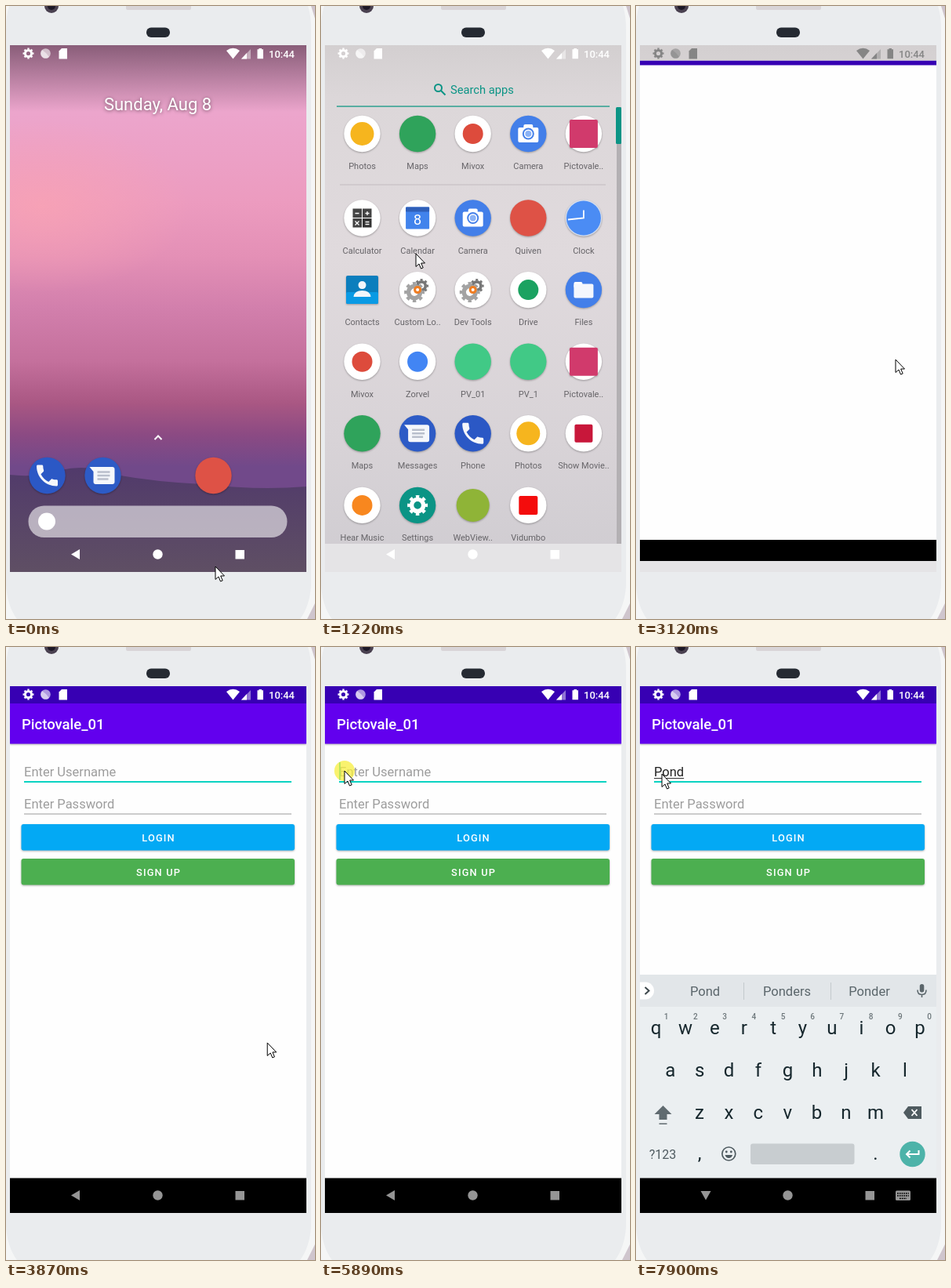
Write an HTML page that moves like this. It is 394 px wide and 782 px high and loops after 8000 ms.

```html
<!DOCTYPE html>
<html lang="en">
<head>
<meta charset="utf-8">
<title>Phone demo</title>
<style>
html, body { margin: 0; width: 100%; height: 100%; overflow: hidden; background: #f5f6f6; }
svg { display: block; width: 100%; height: 100%; font-family: Roboto, "Noto Sans", sans-serif; }
.mid { text-anchor: middle; }
.label { font-size: 11px; fill: #666468; text-anchor: middle; }
.button { font-size: 12.8px; font-weight: 500; letter-spacing: .09em; fill: #fff; text-anchor: middle; }
.lift { filter: drop-shadow(0 1px 1px rgba(0,0,0,.3)); }
.field { font-size: 16.5px; }
.hint { fill: #9d9d9d; }
.word { font-size: 16.5px; fill: #5b666b; text-anchor: middle; }
.key { font-size: 24px; fill: #16272d; text-anchor: middle; }
.digit { font-size: 10px; font-weight: 500; fill: #6d777b; text-anchor: middle; }
</style>
</head>
<body>
<svg viewBox="0 0 394 782">
<defs>
  <linearGradient id="sky" x2="0" y2="1">
    <stop offset="0" stop-color="#e3a3ca"/><stop offset=".13" stop-color="#ecA5cc"/>
    <stop offset=".3" stop-color="#ec9bbf"/><stop offset=".4" stop-color="#e490b6"/>
    <stop offset=".5" stop-color="#d27fac"/><stop offset=".6" stop-color="#c4709c"/>
    <stop offset=".68" stop-color="#a95783"/><stop offset=".74" stop-color="#8b4a83"/>
    <stop offset=".8" stop-color="#71498a"/><stop offset="1" stop-color="#71498a"/>
  </linearGradient>
  <radialGradient id="glow"><stop stop-color="#f9a3b4" stop-opacity=".8"/><stop offset="1" stop-color="#f9a3b4" stop-opacity="0"/></radialGradient>
  <linearGradient id="dune" x2="0" y2="1"><stop stop-color="#513a6b"/><stop offset="1" stop-color="#5f4f64"/></linearGradient>
  <linearGradient id="scrim" x2="0" y2="1"><stop stop-color="#301828" stop-opacity=".5"/><stop offset="1" stop-color="#301828" stop-opacity="0"/></linearGradient>
  <linearGradient id="sheet" x2="0" y2="1">
    <stop stop-color="#d3cfd0"/><stop offset=".1" stop-color="#dcd7d9"/><stop offset=".4" stop-color="#e0dadd"/>
    <stop offset=".75" stop-color="#d8d3d7"/><stop offset="1" stop-color="#cfccd1"/>
  </linearGradient>
  <clipPath id="screen"><rect x="5" y="50" width="378" height="672"/></clipPath>
  <clipPath id="reveal"><rect id="revealBox"/></clipPath>
</defs>

<!-- device body -->
<rect width="394" height="782" fill="#f5f6f6"/>
<path d="M389 0h5v16zM394 762v20h-10z" fill="#cfc5cd"/>
<path d="M4 0Q0 12 0 30V740Q2 766 14 782H375Q387 766 389 740V30Q389 12 385 0Z" fill="#eaecee"/>
<circle cx="58" cy="0" r="9" fill="#4a4150"/><circle cx="58" cy="0" r="5" fill="#1d1826"/>
<rect x="153" y="-4" width="83" height="9" rx="2" fill="#d8d4d7"/>
<rect x="179" y="27.500" width="30" height="12.500" rx="6" fill="#252a32"/>

<g clip-path="url(#screen)">
  <rect x="5" y="50" width="378" height="672" fill="url(#sky)"/>
  <ellipse cx="45" cy="255" rx="190" ry="110" fill="url(#glow)"/>
  <path d="M5 598Q40 602 70 592Q105 584 140 598Q190 607 250 610Q320 618 383 613V722H5Z" fill="url(#dune)"/>
  <rect x="5" y="50" width="378" height="85" fill="url(#scrim)"/>
  <g id="home"></g>
  <rect id="backdrop" x="5" y="50" width="378" height="672" fill="url(#sheet)"/>
  <g id="drawer"></g>
  <g clip-path="url(#reveal)"><g id="win">
    <rect x="5" y="50" width="378" height="690" fill="#fefefe"/>
    <g id="form"></g>
    <g id="keyboard"></g>
    <rect x="5" y="50" width="378" height="22" fill="#3700b3"/>
    <rect x="5" y="677.500" width="378" height="60" fill="#000"/>
  </g></g>
  <g id="status"></g>
  <g id="nav">
    <path id="back"/>
    <circle cx="193.500" cy="699.500" r="6.200"/>
    <rect x="292.500" y="694" width="11.500" height="11.500"/>
    <g id="switcher">
      <rect x="331" y="693.500" width="19" height="12.500" rx="1.500"/>
      <path d="M333 697h15M333 700h15M336 703.500h9" stroke="#000" stroke-width="1.500" stroke-dasharray="1.800 1"/>
    </g>
  </g>
</g>
<g id="pointer">
  <circle id="press" r="13" fill="#f7ee3e" opacity=".75"/>
  <path d="M0 0V16.500L4 13L6.500 19L9.200 17.900L6.700 12H11.500Z" fill="#fff" stroke="#000"/>
</g>
</svg>
<script>
const LOOP = 8000;
const $ = id => document.getElementById(id);
const show = (id, on) => $(id).setAttribute('display', on ? 'inline' : 'none');
const shift = (id, x, y) => $(id).setAttribute('transform', `translate(${x} ${y})`);

// ---------- drawing helpers ----------
const at = (x, y, body) => `<g transform="translate(${x} ${y})">${body}</g>`;
const disc = (color, r = 23.2) => `<circle r="${r}" fill="${color}"/>`;
const box = (x, y, w, h, color, rx = 0) => `<rect x="${x}" y="${y}" width="${w}" height="${h}" rx="${rx}" fill="${color}"/>`;
const text = (x, y, cls, s, more = '') => `<text x="${x}" y="${y}" class="${cls}" ${more}>${s}</text>`;
const line = (d, color, w = 2) => `<path d="${d}" fill="none" stroke="${color}" stroke-width="${w}"/>`;
const gear = (r, color) =>
  `<g fill="none" stroke="${color}"><circle r="${r * .58}" stroke-width="${r * .42}"/>` +
  `<circle r="${r * .86}" stroke-width="${r * .28}" pathLength="16" stroke-dasharray="1" stroke-dashoffset=".5"/></g>`;
const spot = (color, r = 13) => disc('#fff') + disc(color, r);
const tile = (color, s = 24) => disc('#fff') + box(-s / 2, -s / 2, s, s, color, 2);

const tools = disc('#fff') +
  at(5, -5, gear(9, '#777')) + at(-4, 3, gear(13, '#a3a3a3')) + disc('#ef7d22', 5) + disc('#fff', 2);

const icons = {
  photos: spot('#f6b51e', 15),
  maps: disc('#2fa35b'),
  mail: spot('#dd4b3c'),
  camera: disc('#437fe9') + box(-13, -8, 26, 19, '#fff', 2) + box(-6, -12, 12, 7, '#fff', 2) +
    disc('#437fe9', 7.5) + disc('#fff', 5.5) + disc('#8ab2f6', 4),
  pictures: tile('#d13a6c', 36),
  calculator: disc('#fff') + box(-12, -12, 11.5, 11.5, '#444') + box(.5, -12, 11.5, 11.5, '#444') +
    box(-12, .5, 11.5, 11.5, '#444') + box(.5, .5, 11.5, 11.5, '#333') +
    line('M-9 -6h5M4 -6h5M6.500 -8.500v5M-9 4l5 5M-4 4l-5 5M4 5h5M4 8h5', '#fff', 1.3),
  calendar: disc('#fff') + box(-15, -14, 30, 28, '#4183ec', 1) + box(-15, -14, 30, 6, '#2f5fb8', 1) +
    text(0, 8, 'mid', '8', 'font-size="18" fill="#fff"'),
  browser: disc('#de5246'),
  clock: disc('#d5dff0') + disc('#4b8cf4', 22) + line('M-20 2L0 0V-10', '#fff', 1.8),
  contacts: box(-20.5, -18, 41, 36, '#0b7ebd', 2) + box(-20.5, 3, 41, 15, '#0a9ae4', 2) + disc('#fff', 0) +
    at(0, -6, disc('#f2f6fa', 5)) + '<path d="M-11 9Q-10 1 0 1Q10 1 11 9Z" fill="#f2f6fa"/>',
  tools,
  drive: spot('#1ba261'),
  files: disc('#437fe9') + box(-12.5, -10, 11, 8, '#fff', 2) + box(-12.5, -7.5, 25, 18, '#f4f7fd', 2),
  search: spot('#4285f4'),
  robot: disc('#41c986'),
  messages: disc('#2d5bc6') + '<path d="M-17 -11H12Q15 -11 15 -8V8Q15 11 12 11H-9Q-12 11 -12 8V-5Z" fill="#f5f7fb"/>' +
    line('M-7 -4.500H9M-7 0H9M-7 4.500H7', '#b9bfcc', 2.4),
  phone: disc('#2b58c5') + '<path transform="scale(1.5) translate(-12 -12)" fill="#f5f7fb" d="M6.620 10.790c1.440 2.830 3.760 5.140 6.590 6.590l2.200-2.200c.3-.3.7-.4 1-.2 1.100.4 2.300.6 3.600.6.5 0 1 .4 1 1V20c0 .6-.5 1-1 1-9.400 0-17-7.600-17-17 0-.6.4-1 1-1h3.500c.6 0 1 .4 1 1 0 1.200.2 2.400.6 3.600.1.300 0 .7-.3 1z"/>',
  film: tile('#c8173a', 23),
  music: spot('#f8871f'),
  settings: disc('#0b9485') + gear(13, '#fff'),
  web: disc('#8fb437', 21),
  video: tile('#f40c0c', 24)
};
const placed = (name, x, y) => `<g class="lift">${at(x, y, icons[name])}</g>`;

// ---------- home screen ----------
$('home').innerHTML =
  text(193.5, 133, 'mid', 'Sunday, Aug 8', 'font-size="22" fill="#fff" style="filter:drop-shadow(0 1px 2px rgba(0,0,0,.5))"') +
  line('M189.500 553L194 548.500L198.500 553', '#fff') +
  placed('phone', 52.5, 599) + placed('messages', 123.5, 599) + placed('browser', 264.5, 599) +
  box(28.5, 637.5, 330, 40.5, 'rgba(255,255,255,.58)', 20) + at(52, 657.5, disc('#fff', 11));

// ---------- app drawer ----------
const rows = [
  ['photos:Photos', 'maps:Maps', 'mail:Mivox', 'camera:Camera', 'pictures:Pictovale..'],
  ['calculator:Calculator', 'calendar:Calendar', 'camera:Camera', 'browser:Quiven', 'clock:Clock'],
  ['contacts:Contacts', 'tools:Custom Lo..', 'tools:Dev Tools', 'drive:Drive', 'files:Files'],
  ['mail:Mivox', 'search:Zorvel', 'robot:PV_01', 'robot:PV_1', 'pictures:Pictovale..'],
  ['maps:Maps', 'messages:Messages', 'phone:Phone', 'photos:Photos', 'film:Show Movie..'],
  ['music:Hear Music', 'settings:Settings', 'web:WebView..', 'video:Vidumbo']
];
const columnX = i => 52.5 + i * 70.6;
const rowY = i => i ? 261.5 + (i - 1) * 91.6 : 154;
$('drawer').innerHTML =
  `<circle cx="149.500" cy="95.500" r="4.500" fill="none" stroke="#0b9485" stroke-width="2"/>` +
  line('M153 99L158.500 104.500', '#0b9485') +
  text(165, 103, '', 'Search apps', 'font-size="14.7" fill="#0b9485"') +
  box(20, 118.3, 348, 1.5, '#2fa191') + box(24, 218.5, 339, 1, '#c3bcbf') +
  rows.map((row, r) => row.map((cell, c) => {
    const [icon, name] = cell.split(':');
    return placed(icon, columnX(c), rowY(r)) + text(columnX(c), rowY(r) + 45, 'label', name);
  }).join('')).join('') +
  `<circle id="tap" cx="335" cy="445" r="21.500" opacity=".22"/>` +
  box(377, 120, 6, 557, '#b3b0b3') + box(376, 120, 7, 47, '#0b9485', 1.5) +
  box(5, 677, 378, 60, '#e5e4e6');

// ---------- login form ----------
$('form').innerHTML =
  `<g class="lift">${box(5, 72, 378, 51.5, '#6200ee')}</g>` +
  text(20, 105, '', 'Pictovale_01', 'font-size="18.5" font-weight="500" fill="#fff"') +
  text(23, 165, 'field hint', 'Enter Username', 'id="hint"') +
  text(23, 165, 'field', '', 'id="typed" fill="#222"') +
  `<rect id="underline" x="23" y="167" height="1" fill="#333"/>` +
  box(23, 171, 341, 2, '#0bd3c2') + text(23, 206, 'field hint', 'Enter Password') +
  box(23, 212.5, 341, 1, '#9b9b9b') +
  `<rect id="caret" y="147" width="2" height="22.500" fill="#0bc9b9"/>` +
  [['LOGIN', 226, '#03a9f4'], ['SIGN UP', 270, '#4caf50']].map(([name, y, color]) =>
    `<g class="lift">${box(19.5, y, 348.5, 33.5, color, 3)}</g>` + text(194.5, y + 21.7, 'button', name)).join('');

// ---------- keyboard ----------
const keyRow = (letters, x, y) => [...letters].map((k, i) => text(x + i * 37.4, y, 'key', k)).join('');
const wordX = [88, 192.5, 297.5];
$('keyboard').innerHTML =
  box(5, 418, 378, 260, '#ebeff1') + box(5, 418, 378, 41, '#e2e6e9') +
  box(-10, 427.5, 33, 22, '#fff', 11) + line('M11.500 434l5 4.500l-5 4.500', '#3d474b') +
  wordX.map((x, i) => text(x, 445, 'word', '', `id="word${i}"`)).join('') +
  `<g id="dividers">${box(137, 428, 1, 22, '#c3c9cc') + box(248, 428, 1, 22, '#c3c9cc')}</g>` +
  box(361.8, 430, 5.5, 10.5, '#5b666b', 2.7) + line('M359 437.500q0 6 5.500 6t5.500-6M364.500 443v4', '#5b666b', 1.6) +
  keyRow('qwertyuiop', 25.5, 494) + keyRow('asdfghjkl', 43.8, 547.5) + keyRow('zxcvbnm', 81, 602) +
  [...'1234567890'].map((d, i) => text(38.5 + i * 37.3, 475, 'digit', d)).join('') +
  '<path d="M34.500 585L45.500 596H39.500V603H29.500V596H23.500Z" fill="#606b70"/>' + box(29.5, 607.5, 10, 1.5, '#606b70') +
  '<path d="M341 594L347 586H364V602H347Z" fill="#4f5b60"/>' + line('M351.500 590l7 8M358.500 590l-7 8', '#fff', 1.8) +
  text(34, 653, 'mid', '?123', 'font-size="16" fill="#4f5b60"') +
  text(81, 654, 'key', ',') + text(305.5, 654, 'key', '.') +
  at(118.3, 646.5, '<circle r="8.500" fill="none" stroke="#4f5b60" stroke-width="1.700"/>' +
    disc('none', 1) + at(-3, -2.5, disc('#4f5b60', 1.4)) + at(3, -2.5, disc('#4f5b60', 1.4)) +
    '<path d="M-4.800 1.500H4.800Q3.500 5.500 0 5.500T-4.800 1.500Z" fill="#4f5b60"/>') +
  box(146, 633.5, 132.5, 26.5, '#c8cdd0', 3) +
  at(352.5, 647, disc('#4db3a9', 16.2) + line('M8 -5V0H-7M-3 -4.500L-7.500 0L-3 4.500', '#fff'));

// ---------- status bar ----------
$('status').innerHTML =
  at(28.5, 60.5, gear(7, 'currentColor')) +
  at(50.5, 60.5, '<circle r="6.300" opacity=".6"/><path d="M-4.500 -4.500A6.300 6.300 0 0 0 4.500 4.500Q1 -1 -4.500 -4.500Z" opacity=".5"/>') +
  '<path d="M71 54H78V67.500H67.500V57.500Z"/>' +
  '<path d="M281 57Q289.500 50.500 298 57L289.500 67.500Z"/>' +
  '<path d="M300 67.500H312V55Z" opacity=".45"/><path d="M300 67.500H307V60Z"/>' +
  '<path d="M320.500 55.300H322.500V54H326V55.300H328V67.300H320.500Z"/>' +
  text(335, 65.8, '', '10:44', 'font-size="13" font-weight="500"');

// ---------- timing ----------
// Runs of screen updates: first time, last time, count. The picture holds in between.
const runs = [
  [130, 470, 4], [720, 1350, 6], [1490, 2230, 7], [2730, 2730, 1], [2870, 3620, 7], [3760, 4500, 7],
  [4890, 5640, 7], [5760, 6390, 6], [6770, 6890, 2], [7030, 7400, 4], [7900, 7900, 1]
];
const steps = [0, ...runs.flatMap(([from, to, n]) =>
  Array.from({ length: n }, (_, i) => Math.floor((from + (to - from) * i / Math.max(1, n - 1)) / 10) * 10))];
const held = t => steps.filter(s => s <= t + 8).pop();

const lerp = (a, b, k) => a + (b - a) * k;
function track(keys, t, col = 1) {
  const next = keys.findIndex(k => k[0] > t);
  if (next < 0) return keys[keys.length - 1][col];
  if (!next) return keys[0][col];
  const a = keys[next - 1], b = keys[next];
  return lerp(a[col], b[col], (t - a[0]) / (b[0] - a[0]));
}
const latest = (keys, t) => keys.filter(k => k[0] <= t).pop()[1];
const within = (t, spans) => spans.some(([a, b]) => t >= a && t < b);

const path = [
  [0, 267, 715], [470, 184, 699], [720, 184, 699], [850, 172, 610], [1090, 118, 360], [1220, 121, 316],
  [1350, 162, 330], [1610, 185, 470], [1740, 215, 513], [1980, 290, 488], [2230, 331, 451],
  [3620, 331, 451], [4500, 345, 790], [4890, -20, 520], [5010, 1, 500], [5260, 214, 270],
  [5510, 60, 170], [5640, 30, 158], [5890, 30, 158], [6390, 33, 162]
];
const drawerDrop = [[720, 600], [840, 470], [970, 190], [1090, 45], [1220, 9], [1350, 0]];
const opening = [[2860, 0], [2870, .12], [2990, .7], [3120, .95], [3240, 1]];
const keyboardDrop = [[5880, 260], [6010, 185], [6130, 45], [6260, 0]];
const typing = [[0, ''], [6890, 'P'], [7030, 'Po'], [7150, 'Pon'], [7270, 'Pond']];
const words = [[0, []], [7150, ['Po', 'Pot', 'Pool']], [7270, ['Pon', 'Pony', 'Pond']], [7400, ['Pond', 'Ponders', 'Ponder']]];
const statusColor = [[0, '#fff'], [1350, '#616161'], [3120, '#858585'], [3240, '#fff']];
const navColor = [[0, '#fff'], [1350, '#555'], [2870, '#000'], [3240, '#959595']];
const caretOn = [[3890, 4380], [4890, 5390], [5760, 6260], [6770, 7900]];
const pressed = [[720, 1090], [2730, 2870], [5760, 6010]];

function render(t) {
  const drop = track(drawerDrop, t), rise = 1 - drop / 600;
  shift('home', 0, -rise * 200);
  $('home').setAttribute('opacity', Math.max(0, 1 - rise * 2));
  $('backdrop').setAttribute('opacity', Math.min(1, rise * 1.03));
  shift('drawer', 0, drop);
  $('drawer').setAttribute('opacity', Math.min(1, rise * 1.4));
  show('tap', t >= 2730);

  const open = track(opening, t), wide = Math.min(1, open * 1.3);
  const left = lerp(335, 5, wide), top = lerp(444, 50, open);
  const frame = { x: left, y: top, width: lerp(335, 383, wide) - left, height: lerp(444, 722, open) - top };
  for (const name in frame) $('revealBox').setAttribute(name, frame[name]);
  shift('win', 0, 70 * (1 - open));
  show('form', t >= 3760);

  const typed = latest(typing, t);
  $('typed').textContent = typed;
  show('hint', !typed);
  const end = typed ? $('typed').getComputedTextLength() : 0;
  $('underline').setAttribute('width', end);
  $('caret').setAttribute('x', 23 + end);
  show('caret', within(t, caretOn));

  shift('keyboard', 0, track(keyboardDrop, t));
  const list = latest(words, t);
  wordX.forEach((_, i) => $('word' + i).textContent = list[i] || '');
  show('dividers', list.length);

  $('status').setAttribute('fill', latest(statusColor, t));
  $('status').setAttribute('color', latest(statusColor, t));
  $('nav').setAttribute('fill', latest(navColor, t));
  const typingMode = t >= 6130;
  $('back').setAttribute('d', typingMode ? 'M82.500 694H95.500L89 705.500Z' : 'M83 699.500L94 693V706Z');
  show('switcher', typingMode);

  shift('pointer', track(path, t), track(path, t, 2));
  show('press', within(t, pressed));
}

const start = performance.now();
function tick() {
  render(held((performance.now() - start) % LOOP));
  requestAnimationFrame(tick);
}
tick();
</script>
</body>
</html>
```
